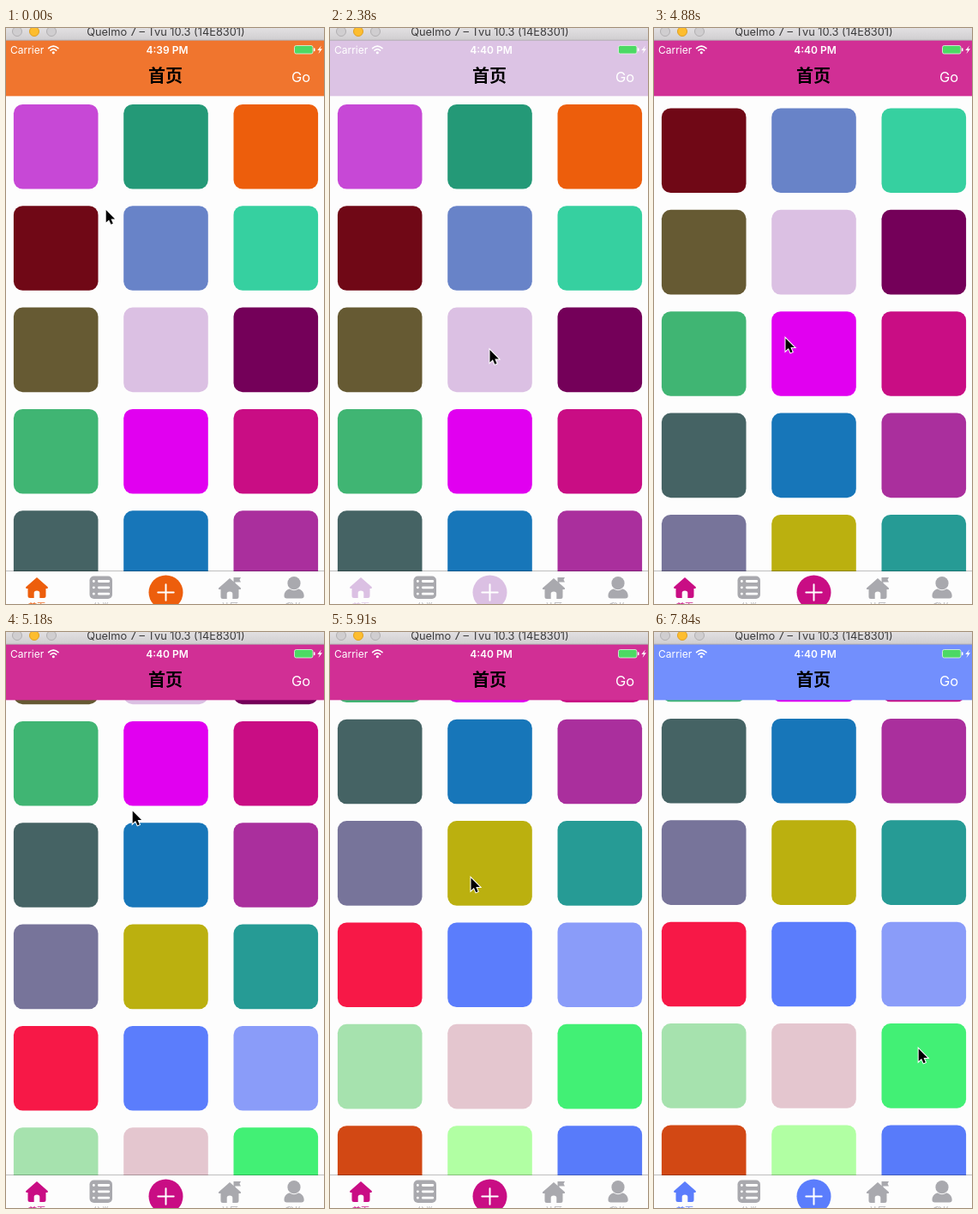
Recreate the animation shown at these times as an HTML page. Size 371x671 px, loop 7.99 s.

```html
<!DOCTYPE html>
<html lang="zh">
<head>
<meta charset="utf-8">
<title>首页</title>
<style>
  html, body { margin: 0; width: 100%; height: 100%; overflow: hidden; background: #fdfdfd; }
  svg { display: block; width: 100%; height: 100%; }
  text { font-family: Inter, "Noto Sans CJK SC", "Noto Sans CJK", sans-serif; }
  .middle { text-anchor: middle; }
  .theme { fill: var(--theme); }
  .gray { fill: #a9a9ae; }
  .tab { font-size: 10px; text-anchor: middle; }
  .line { fill: none; stroke: #fff; stroke-linecap: round; }
</style>
</head>
<body>
<svg id="stage" viewBox="0 0 371 671">
  <defs>
    <linearGradient id="chrome" x2="0" y2="1">
      <stop stop-color="#e2e0e2"/><stop offset="1" stop-color="#d0ced0"/>
    </linearGradient>
    <path id="house" d="M13 0 L25.8 11.2 Q26.6 13 24.8 13 H23.5 V21.5 Q23.5 24 21 24 H16.3 V18 Q16.3 15.5 13 15.5 T9.7 18 V24 H5 Q2.5 24 2.5 21.5 V13 H1.2 Q-.6 13 .2 11.2 Z"/>
  </defs>
  <rect width="371" height="671" fill="#fdfdfd"/>
  <g id="grid"></g>

  <g id="header">
    <rect class="theme" y="14" width="371" height="65.3"/>
    <rect id="veil" y="14" width="371" height="65.3" fill="#fff"/>
    <g fill="#fff">
      <text x="5" y="29.6" font-size="12">Carrier</text>
      <text id="clock" class="middle" x="188" y="29.6" font-size="12" font-weight="600"></text>
      <text x="333" y="63.4" font-size="16.5">Go</text>
      <circle cx="55.3" cy="28.7" r="1.5"/>
      <path d="M368 20.5 L363.3 26 H366 L364.5 30 L369 24.3 H366.3 Z"/>
      <rect x="359" y="23.3" width="1.5" height="4" rx=".7"/>
    </g>
    <path class="line" stroke-width="1.6" stroke-linecap="butt" d="M49.6 23.6 Q55.3 18.5 61 23.6 M52 26.2 Q55.3 23.2 58.6 26.2"/>
    <rect x="336.5" y="20.5" width="21.5" height="9.5" rx="2" fill="#4cd964" stroke="#e8f4e8" stroke-width=".8"/>
    <text class="middle" x="186" y="63" font-size="20" font-weight="700">首页</text>
  </g>

  <g id="titlebar">
    <rect width="371" height="14" fill="url(#chrome)"/>
    <path d="M0 14.2 H371" stroke="#b1afb1"/>
    <g fill="#d0ced0" stroke="#b1afb1">
      <circle cx="13" cy="4" r="5.5"/>
      <circle cx="33" cy="4" r="5.5" fill="#fdbd2f" stroke="#dfa023"/>
      <circle cx="53" cy="4" r="5.5"/>
    </g>
    <text class="middle" x="186.5" y="9" font-size="12.8" fill="#3b3a3b">Quelmo 7 – Tvu 10.3 (14E8301)</text>
  </g>

  <g id="tabbar">
    <rect y="633" width="371" height="38" fill="#fdfdfd"/>
    <path d="M0 632.5 H371" stroke="#000" stroke-opacity=".25"/>
    <use href="#house" class="theme" x="23" y="640"/>
    <text class="tab theme" x="36" y="678">首页</text>
    <g class="gray">
      <rect x="97.5" y="638.5" width="26.5" height="26.5" rx="5"/>
      <use href="#house" x="248" y="641"/>
      <path d="M265.5 640 H274 L272.5 642.8 L274 645.5 H267.3 V650 H265.5 Z"/>
      <circle cx="336" cy="646.7" r="7.6"/>
      <path d="M324.5 661.5 C324.5 656 329 653.5 331 653.5 Q336 657 341 653.5 C343 653.5 347.7 656 347.7 661.5 Q347.7 664.5 344.5 664.5 H327.7 Q324.5 664.5 324.5 661.5 Z"/>
      <text class="tab" x="111" y="678">分类</text>
      <text class="tab" x="261" y="678">社区</text>
      <text class="tab" x="336" y="678">我的</text>
    </g>
    <path class="line" stroke-width="2.8" d="M102.3 644.5 h.1 M102.3 651.8 h.1 M102.3 659.2 h.1 M108.3 644.5 h11.5 M108.3 651.8 h11.5 M108.3 659.2 h11.5"/>
    <circle class="theme" cx="186.5" cy="657.5" r="20"/>
    <path class="line" stroke-width="2" d="M177.3 657.5 H195.7 M186.5 648.3 V666.7"/>
  </g>

  <path id="cursor" d="M0 0 V14.6 L3.4 11.4 L5.8 16.8 L8.1 15.8 L5.8 10.5 H10.4 Z" stroke="#fff" stroke-width="2" paint-order="stroke"/>
</svg>
<script>
const STEP = 148, LAST_STEP = 53, LOOP = 7990, TILE = 98.6;
const [stage, grid, veil, clock, cursor] =
  ["stage", "grid", "veil", "clock", "cursor"].map(id => document.getElementById(id));

const colors = `c748d6 249977 ed5e0c 700816 6883c8 36d0a0 665a33 dbc0e3 740059
  40b573 e100f0 c90d84 456364 1776b9 aa2f9d 77749a bbb00f 269b95
  f71847 5b7dfc 8a9cf9 a6e2ae e4c6cf 42f075 d24814 b1ffa3 587bfa`.split(/\s+/).map(c => "#" + c);

const tileX = i => 8.9 + 128.3 * (i % 3);
const tileY = i => 88.9 + 118.35 * Math.floor(i / 3);

grid.innerHTML = colors.map((color, i) =>
  `<rect x="${tileX(i)}" y="${tileY(i)}" width="${TILE}" height="${TILE}" rx="10.5" fill="${color}"/>`).join("");

// The flick speeds up, then glides to rest.
const scrollAt = step => 461.3 / (1 + Math.exp(-1.074 * (step - 34.04)));

// Tiles are tapped in reading order: 2 to 11 before the scroll, 16 to 19 after it, faster.
const tapStep = tile => tile < 12 ? 3.5 * tile - 8.5 : 2 * tile + 10;
const taps = colors.map((_, tile) => ({ tile, step: tapStep(tile) }))
  .filter(({ tile }) => tile > 1 && tile < 12 || tile > 15 && tile < 20);

// The pointer visits each tapped tile and a few places in between.
const places = [[0, 116.7, 212], [9, 268.5, 260], [24, 183.5, 495], [32, 157, 455],
  [33, 153.5, 361.5], [35, 147.7, 208.5], [40, 164.5, 286.5], [49, 182, 386], [53, 308.7, 485.5]];
const stops = [
  ...places.map(([step, x, y]) => ({ step, x, y })),
  ...taps.map(({ tile, step }) => ({
    step, x: tileX(tile) + TILE / 2, y: tileY(tile) + TILE / 2 - scrollAt(step)
  }))
].sort((a, b) => a.step - b.step);

function pointerAt(step) {
  const next = stops.findIndex(stop => stop.step >= step);
  const a = stops[Math.max(0, next - 1)], b = stops[next];
  const u = (step - a.step) / (b.step - a.step || 1);
  return [a.x + (b.x - a.x) * u, a.y + (b.y - a.y) * u];
}

function draw(now) {
  const step = Math.min(LAST_STEP, Math.floor((now % LOOP + 12) / STEP));
  const tap = taps.findLast(tap => tap.step <= step);
  stage.style.setProperty("--theme", colors[tap.tile]);
  veil.setAttribute("opacity", Math.min(.14, .04 + .1 * (step - tap.step)));
  clock.textContent = step < 5 ? "4:39 PM" : "4:40 PM";
  grid.setAttribute("transform", `translate(0 ${-scrollAt(step)})`);
  cursor.setAttribute("transform", `translate(${pointerAt(step)})`);
  requestAnimationFrame(draw);
}
draw(0);
</script>
</body>
</html>
```
